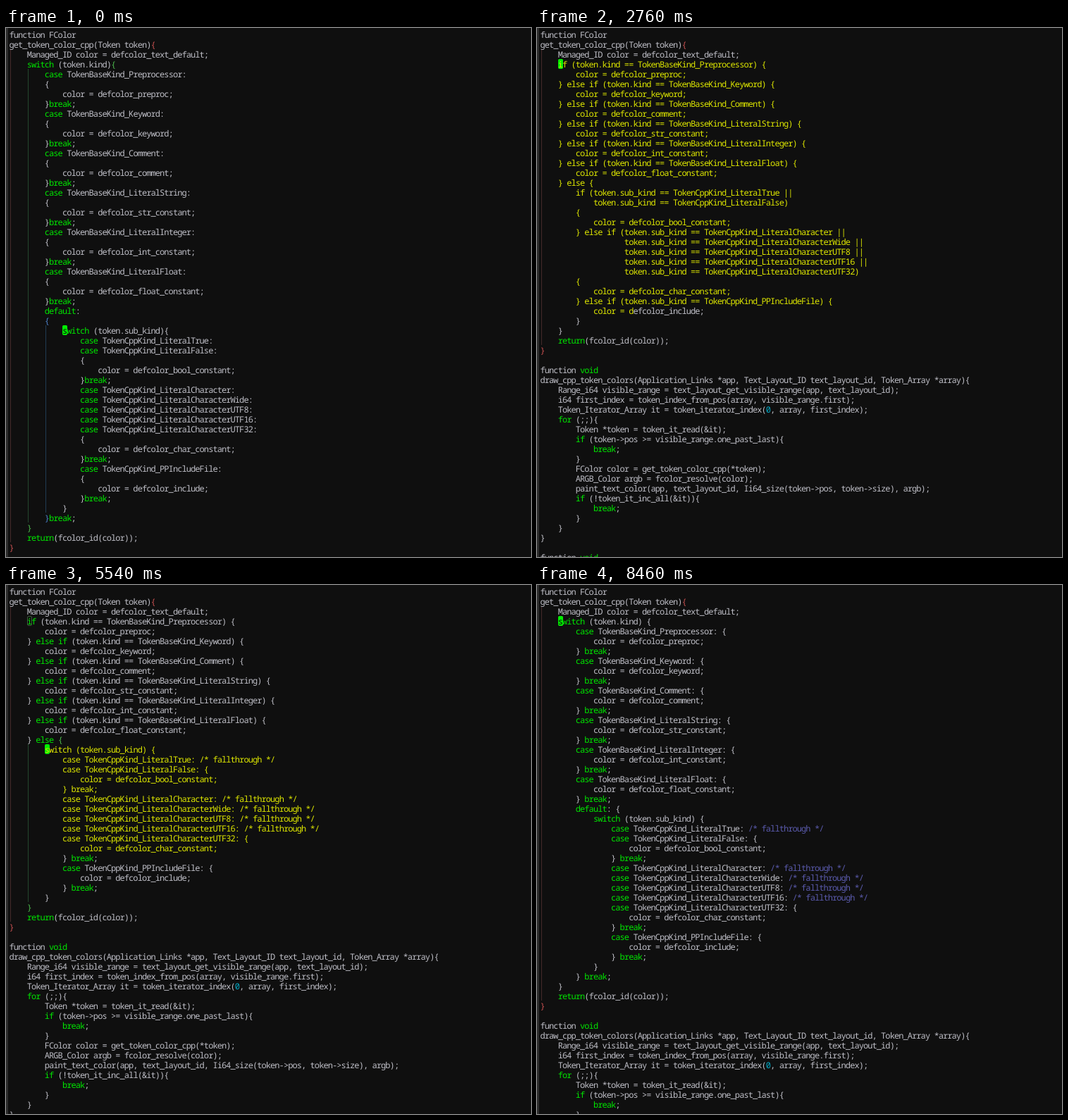
These frames come from a looping animation (745x751 px, 9020 ms). An HTML page:

```html
<!DOCTYPE html>
<html>
<head>
<meta charset="utf-8">
<style>
html, body { margin: 0; width: 100%; height: 100%; overflow: hidden; background: #0f0f0f; }
#stage { position: relative; width: 100%; height: 100%; overflow: hidden; contain: strict; }
#bar { position: absolute; left: 0; top: 0; width: 3px; height: 100%; background: #2c2c2c; }
#boxes div { position: absolute; box-sizing: border-box; }
pre {
  position: absolute; top: 3px; margin: 0;
  font: 500 12px/14px "Noto Sans Mono", "DejaVu Sans Mono", monospace;
  left: calc(5px + (6.28px - 1ch) / 2);
  letter-spacing: calc(6.28px - 1ch);
  text-rendering: geometricPrecision; font-variant-ligatures: none;
}
</style>
</head>
<body>
<div id="stage">
  <div id="bar"></div>
  <div id="boxes"></div>
  <pre id="code"></pre>
</div>
<script>
const LOOP = 9020, CELL = 6.28, LINE = 14, LEFT = 5, TOP = 2, ROWS = 54;
const TEXT = '#bebec6', KEYWORD = '#00e400', NUMBER = '#00a8c4', COMMENT = '#5a5aac';
const PASTE = '#dde600', CURSOR = '#00ee00', UNDER_CURSOR = '#0c0c0c', MARK = '#3c5a3c';
const CYCLE = ['#c85050', '#4cb84c', '#4c80c8'];
const GUIDES = ['#442a2a', '#24462e', '#203c54'];

const indent = (text, n) => text.replace(/^(?=.)/gm, ' '.repeat(n));
const assign = name => `    color = defcolor_${name};\n`;

const kinds = [['Preprocessor', 'preproc'], ['Keyword', 'keyword'], ['Comment', 'comment'],
  ['LiteralString', 'str_constant'], ['LiteralInteger', 'int_constant'], ['LiteralFloat', 'float_constant']];
const subKinds = [
  [['LiteralTrue', 'LiteralFalse'], 'bool_constant'],
  [['', 'Wide', 'UTF8', 'UTF16', 'UTF32'].map(s => 'LiteralCharacter' + s), 'char_constant'],
  [['PPIncludeFile'], 'include']];

// Switch statements, either with braces on their own line or compact
const tall = { open: '{\n', next: ':\n', body: ':\n{\n', end: '}break;\n' };
const compact = { open: ' {\n', next: ': /* fallthrough */\n', body: ': {\n', end: '} break;\n' };
const subSwitch = s => `switch (token.sub_kind)${s.open}` + indent(subKinds.map(([names, color]) =>
  names.map(n => 'case TokenCppKind_' + n).join(s.next) + s.body + assign(color) + s.end).join(''), 4) + '}\n';
const kindSwitch = (s, inner) => `switch (token.kind)${s.open}` + indent(kinds.map(([name, color]) =>
  'case TokenBaseKind_' + name + s.body + assign(color) + s.end).join('') +
  'default' + s.body + indent(inner, 4) + s.end, 4) + '}\n';

const subIf = subKinds.map(([names, color], i) => {
  const head = i ? '} else if (' : 'if (';
  return head + names.map(n => 'token.sub_kind == TokenCppKind_' + n).join(' ||\n' + ' '.repeat(i ? 11 : 4)) +
    (names.length > 1 ? ')\n{\n' : ') {\n') + assign(color);
}).join('') + '}\n';
const kindIf = inner => kinds.map(([name, color], i) =>
  `${i ? '} else ' : ''}if (token.kind == TokenBaseKind_${name}) {\n` + assign(color)).join('') +
  '} else {\n' + indent(inner, 4) + '}\n';

const whole = body => `function FColor
get_token_color_cpp(Token token){
    Managed_ID color = defcolor_text_default;
${indent(body, 4)}    return(fcolor_id(color));
}

function void
draw_cpp_token_colors(Application_Links *app, Text_Layout_ID text_layout_id, Token_Array *array){
    Range_i64 visible_range = text_layout_get_visible_range(app, text_layout_id);
    i64 first_index = token_index_from_pos(array, visible_range.first);
    Token_Iterator_Array it = token_iterator_index(0, array, first_index);
    for (;;){
        Token *token = token_it_read(&it);
        if (token->pos >= visible_range.one_past_last){
            break;
        }
        FColor color = get_token_color_cpp(*token);
        ARGB_Color argb = fcolor_resolve(color);
        paint_text_color(app, text_layout_id, Ii64_size(token->pos, token->size), argb);
        if (!token_it_inc_all(&it)){
            break;
        }
    }
}

function void`.split('\n').slice(0, ROWS).join('\n');

// pasted: where the glowing range starts and ends; mark: [line, col]
const afterChar = /(?<=char_constant;)/;
const docs = [
  { at: 0, text: whole(kindSwitch(tall, subSwitch(tall))), mark: [30, 12] },
  { at: 1390, text: whole(kindSwitch(tall, subIf)), mark: [30, 12], pasted: [/if \(token.sub/, /Kind_\w+UTF32/] },
  { at: 2760, text: whole(kindIf(subIf)), mark: [3, 4], pasted: [/if \(token.kind/, /efcolor_include/] },
  { at: 5540, text: whole(kindIf(subSwitch(compact))), mark: [3, 4], pasted: [/switch/, afterChar] },
  { at: 7070, text: whole(kindSwitch(compact, subSwitch(compact))), mark: [3, 4], pasted: [/switch/, afterChar] }
];

// time, document, cursor line, cursor column
const moves = [
  [0, 0, 30, 12], [1390, 1, 30, 12], [1930, 1, 29, 9], [2090, 1, 28, 12], [2230, 1, 27, 12],
  [2760, 2, 3, 4], [3470, 2, 4, 4], [4030, 2, 8, 4], [4170, 2, 12, 4], [4430, 2, 13, 4],
  [4570, 2, 14, 4], [4700, 2, 16, 4], [4850, 2, 17, 4],
  [5540, 3, 16, 8], [6230, 3, 15, 8], [7070, 4, 3, 4]];

const place = (text, line, col) =>
  text.split('\n').slice(0, line).reduce((sum, row) => sum + row.length + 1, col);
const lineOf = (text, pos) => text.slice(0, pos).split('\n').length - 1;

// Bracket pairs around a position, outermost first
function enclosing(text, pos, open, close) {
  const stack = [], pairs = [];
  for (let i = 0; i < text.length; i++) {
    if (text[i] === open) stack.push(i);
    if (text[i] === close) {
      const start = stack.pop();
      if (start < pos && pos <= i) pairs.unshift([start, i]);
    }
  }
  return pairs;
}

const box = (x, y, w, h, style) =>
  `<div style="left:${x}px;top:${y}px;width:${w}px;height:${h}px;${style}"></div>`;
const cell = (line, col, style) =>
  box(LEFT + col * CELL, TOP + line * LINE, CELL + .5, LINE, 'border-radius:2px;' + style);

function syntax(text) {
  const colors = Array(text.length).fill(TEXT);
  const tokens = /\/\*.*?\*\/|\b(?:case|break|default|switch|if|else|return|for|void)\b|\b0\b/g;
  for (const m of text.matchAll(tokens)) {
    const color = m[0][0] === '/' ? COMMENT : m[0] === '0' ? NUMBER : KEYWORD;
    colors.fill(color, m.index, m.index + m[0].length);
  }
  return colors;
}

function render({ text, mark, pasted }, line, col, glow) {
  const pos = place(text, line, col), colors = syntax(text);
  let shapes = '';
  for (const pair of ['{}', '()'])
    enclosing(text, pos, ...pair).forEach(([a, b], depth) => {
      colors[a] = colors[b] = CYCLE[depth % 3];
      if (pair === '()') return;
      const first = lineOf(text, a) + 1, last = lineOf(text, b);
      const x = Math.floor(LEFT + text.split('\n')[first - 1].search(/\S/) * CELL) + 1;
      shapes += box(x, TOP + first * LINE, 1, (last - first) * LINE, 'background:' + GUIDES[depth % 3]);
    });
  shapes += cell(...mark, `border:1px solid ${MARK}`) + cell(line, col, `background:${CURSOR}`);
  colors[pos] = UNDER_CURSOR;
  if (glow > 0 && pasted) {
    const [from, to] = pasted.map(p => text.search(p));
    for (let i = from; i < to; i++)
      colors[i] = `color-mix(in srgb, ${PASTE} ${glow * 100}%, ${colors[i]})`;
  }
  let html = '';
  for (let i = 0, j; i < text.length; i = j) {
    for (j = i + 1; j < text.length && colors[j] === colors[i];) j++;
    const run = text.slice(i, j).replace(/&/g, '&amp;').replace(/</g, '&lt;');
    html += `<span style="color:${colors[i]}">${run}</span>`;
  }
  document.getElementById('boxes').innerHTML = shapes;
  document.getElementById('code').innerHTML = html;
}

let shown;
function frame() {
  const t = performance.now() % LOOP;
  const move = moves.findLast(m => m[0] <= t);
  const doc = docs[move[1]];
  // the paste glow fades in four steps
  const glow = Math.max(0, 1 - Math.floor((t - doc.at + 10) / 140) / 4);
  const key = move[0] + ':' + glow;
  if (key !== shown) render(doc, move[2], move[3], glow);
  shown = key;
  requestAnimationFrame(frame);
}
frame();
</script>
</body>
</html>
```
